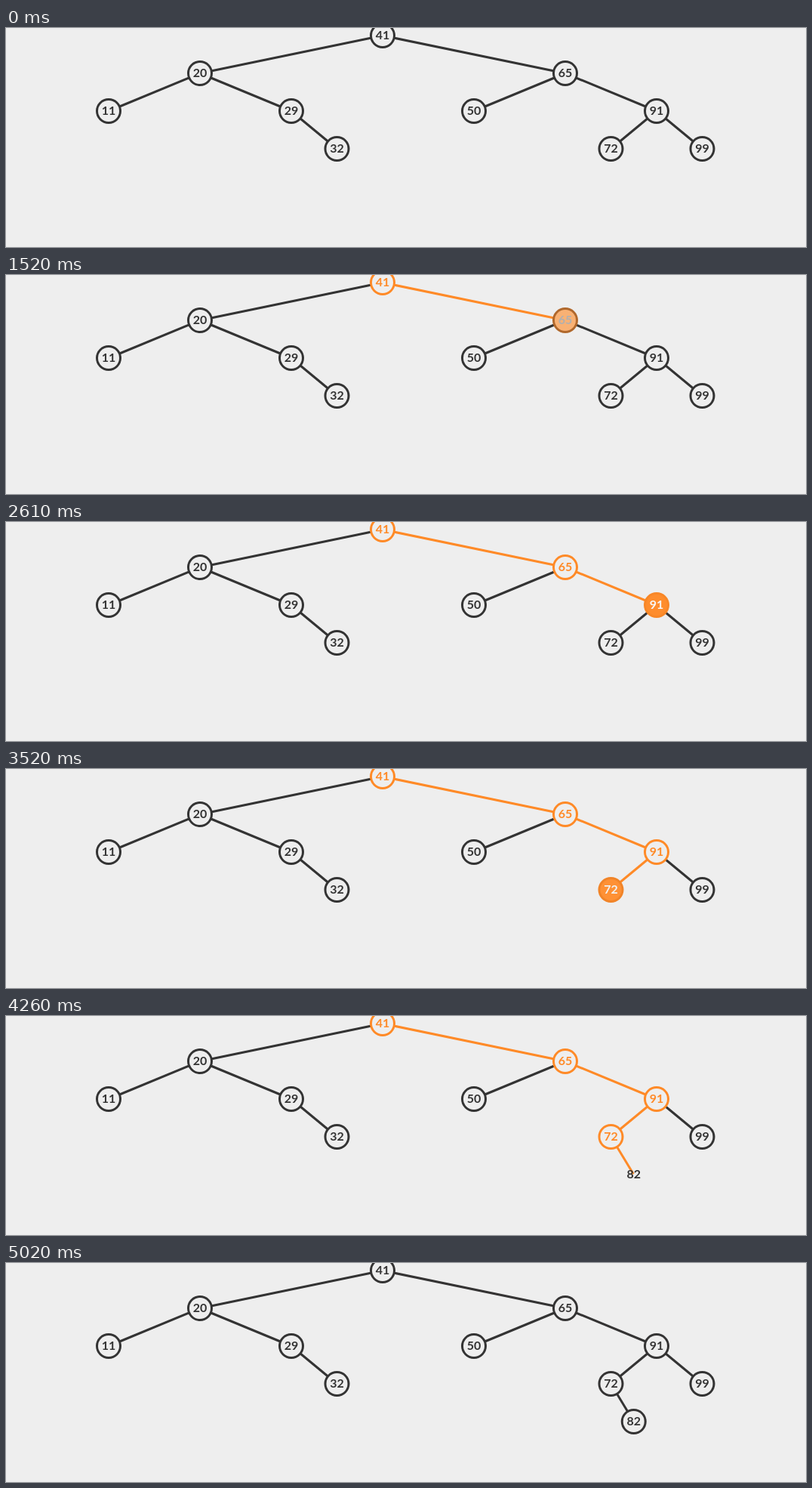
Animation, 1060 px wide and 290 px high, one loop 5120 ms. Source, as an HTML page:

```html
<!DOCTYPE html>
<html lang="en">
<head>
<meta charset="utf-8">
<title>Binary search tree: insert 82</title>
<style>
  html, body { margin: 0; width: 100%; height: 100%; overflow: hidden; background: #eee; }
  svg { display: block; }
  line { stroke-width: 3; }
  text { font: bold 16px Lato, "Open Sans", sans-serif; text-anchor: middle; }
</style>
</head>
<body>
<svg id="stage" width="1060" height="290" viewBox="0 0 1060 290"></svg>
<script>
// All times in ms. Each visit lights a node, then the search moves on along an edge.
const LOOP = 5120, TICK = 80, FADE = 250, TRAVEL = 500;
const FIRST_VISIT = 410, VISIT = 975, STAY = 480, RESET = 4735;
const DARK = [51, 51, 51], ORANGE = [255, 138, 39], WHITE = [255, 255, 255], PAPER = [238, 238, 238];
const NEW_VALUE = 82;

const stage = document.getElementById('stage');
const set = (el, attrs) => {
  for (const name in attrs) el.setAttribute(name, attrs[name]);
  return el;
};
const add = (tag, attrs) =>
  stage.appendChild(set(document.createElementNS('http://www.w3.org/2000/svg', tag), attrs));

const lerp = (a, b, p) => a + (b - a) * p;
const mix = (a, b, p) => a.map((v, i) => lerp(v, b[i], p));
const css = color => `rgb(${color.map(Math.round).join()})`;
const progress = (t, start, duration) => {
  const p = Math.min(1, Math.max(0, (t - start) / duration));
  return p < 0.5 ? 4 * p ** 3 : 1 - 4 * (1 - p) ** 3;
};

const nodes = [];

// Inserts a value, halving the horizontal offset at every level; returns the search path.
function insert(value) {
  const path = [];
  let x = 499, y = 10, offset = 242, node = nodes[0], parent, side;
  while (node) {
    path.push(node);
    side = value < node.value ? 'smaller' : 'larger';
    x += side === 'smaller' ? -offset : offset;
    y += 50;
    offset /= 2;
    parent = node;
    node = node[side];
  }
  node = { value, x, y, parent, lit: Infinity, left: Infinity };
  if (parent) parent[side] = node;
  nodes.push(node);
  return [...path, node];
}

[41, 20, 65, 11, 29, 50, 91, 32, 72, 99].forEach(insert);
insert(NEW_VALUE).forEach((node, i) => {
  node.isNew = node.value === NEW_VALUE;
  node.lit = FIRST_VISIT + i * VISIT;
  if (!node.isNew) node.left = node.lit + STAY;
});

for (const n of nodes.filter(n => n.parent)) {
  const ends = { x1: n.parent.x, y1: n.parent.y, x2: n.x, y2: n.y };
  n.edge = add('line', { ...ends, stroke: css(DARK), opacity: n.isNew ? 0 : 1 });
  n.trail = add('line', ends);
}
for (const n of nodes) {
  n.ring = add('circle', { cx: n.x, cy: n.y });
  n.disc = add('circle', { cx: n.x, cy: n.y });
  n.label = add('text', { x: n.x, y: n.y + 16 / 3 });
  n.label.textContent = n.value;
}

function drawEdge({ x, y, parent, lit, edge, trail }, t, reset) {
  const travelled = isFinite(lit) ? progress(t, parent.left, TRAVEL) : 0;
  const tipX = lerp(parent.x, x, travelled), tipY = lerp(parent.y, y, travelled);
  set(edge, { x1: tipX, y1: tipY });
  set(trail, { x2: tipX, y2: tipY, stroke: css(mix(ORANGE, DARK, reset)) });
}

function drawNode(n, t, reset) {
  const lit = progress(t, n.lit, FADE), left = progress(t, n.left, FADE);
  const scale = n.isNew ? lit : 1;
  const text = mix(mix(mix(DARK, WHITE, lit), ORANGE, left), DARK, reset);
  set(n.ring, { r: 17 * scale, fill: css(mix(DARK, ORANGE, lit * (1 - reset))) });
  set(n.disc, { r: 14 * scale, fill: css(mix(PAPER, ORANGE, lit * (1 - left) * (1 - reset))) });
  set(n.label, { fill: css(text), opacity: n.isNew && t < n.parent.left ? 0 : 1 });
}

function render() {
  const now = performance.now() % LOOP;
  const t = Math.floor(now / TICK) * TICK;
  const reset = progress(t, RESET, FADE);
  for (const n of nodes) {
    if (n.parent) drawEdge(n, t, reset);
    drawNode(n, t, reset);
  }
  requestAnimationFrame(render);
}
render();
</script>
</body>
</html>
```
